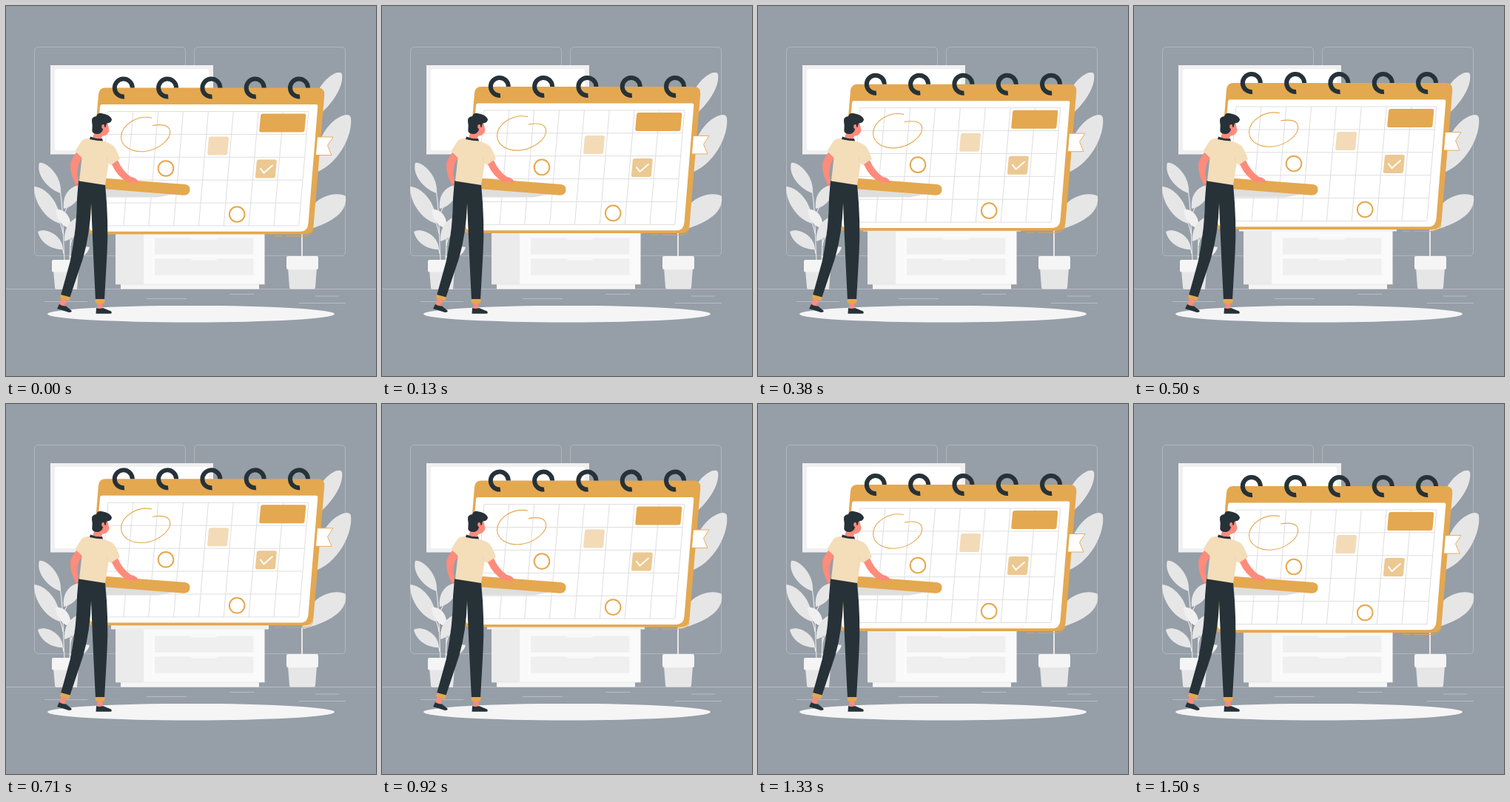
An HTML page with a canvas that plays this animation: 500 px wide and 500 px high, repeating every 1540 ms.

```html
<!DOCTYPE html>
<html lang="en">
<head>
<meta charset="utf-8">
<title>Calendar planning</title>
<style>
  html, body { margin: 0; width: 100%; height: 100%; overflow: hidden; background: #969ea7; }
  canvas { display: block; width: 500px; height: 500px; }
</style>
</head>
<body>
<canvas id="stage" width="500" height="500"></canvas>
<script>
const ctx = document.getElementById('stage').getContext('2d');

const LOOP = 1540, FPS = 24, LAST_STEP = 36;
const AMBER = '#e4a850', DARK = '#263238', SKIN = '#ff8b7b', SHIRT = '#f4ddb9';
const LINE = '#b7bdc4', PALE = '#f5f5f5', GREY = '#e6e6e6';

function fill(path, color) {
  ctx.fillStyle = color;
  ctx.fill(new Path2D(path));
}

function stroke(path, color, width = 1) {
  ctx.strokeStyle = color;
  ctx.lineWidth = width;
  ctx.stroke(new Path2D(path));
}

function box(x, y, w, h, color, r = 0) {
  ctx.fillStyle = color;
  ctx.beginPath();
  ctx.roundRect(x, y, w, h, r);
  ctx.fill();
}

function ellipse(x, y, rx, ry) {
  ctx.beginPath();
  ctx.ellipse(x, y, rx, ry, 0, 0, Math.PI * 2);
}

function drawRoom() {
  ctx.fillStyle = '#969ea7';
  ctx.fillRect(0, 0, 500, 500);

  ctx.strokeStyle = LINE;
  ctx.lineWidth = 0.8;
  for (const x of [38.5, 254.5]) {
    ctx.beginPath();
    ctx.roundRect(x, 55.5, 204, 282, 5);
    ctx.stroke();
  }
  stroke('M0 382.5H500 M52 399.5H110 M190 395.5H244 M302 389.5H336 M418 392H450 M396 401.5H459', LINE);

  box(60, 80, 220, 120.5, '#f0f0f0');
  box(66, 85, 208, 110, '#fff', 2);
}

function drawRightPlant() {
  fill('M454 92C450 84 426 98 418 124L414 154C438 138 457 110 454 92Z', GREY);
  fill('M466 151C464 140 438 152 427 176C420 192 415 210 413 227C449 217 469 174 466 151Z', GREY);
  fill('M459 257C450 251 424 254 412 273L402 304C427 297 463 284 459 257Z', GREY);
  stroke('M400 339V304Q402 298 412 291', '#f0f0f0', 1.8);
  fill('M381 354H420L418 380Q418 382.5 415 382.5H386Q383 382.5 383 380Z', GREY);
  box(379, 338, 43, 18, PALE, 2);
}

function drawLeftPlant() {
  stroke('M79 344C77 315 78 278 73 248 M77 308Q76 300 72 290 M78 335Q78 330 75 326 M77 290Q79 276 86 267', GREY, 1.2);
  stroke('M86 344Q88 318 86 297 M87 324Q88 313 95 307 M86 340Q92 332 104 330', '#f0f0f0', 1.2);
  fill('M45 212C52 209 76 227 74 253C59 249 40 229 45 212Z', GREY);
  fill('M38 244C51 244 74 263 73 294C54 289 37 265 38 244Z', GREY);
  fill('M43 305C53 299 76 309 77 329C62 329 47 321 43 305Z', GREY);
  fill('M104 241C84 243 76 257 78 274C92 271 103 258 104 241Z', GREY);
  fill('M67 275C77 273 89 283 87 300C76 299 68 288 67 275Z', '#f0f0f0');
  fill('M103 283C86 288 78 300 79 318C95 313 105 299 103 283Z', GREY);
  fill('M113 326C104 323 90 331 87 341C100 342 110 337 113 326Z', '#f0f0f0');
  fill('M64 357H98L96 383H69Q66 383 66 380Z', GREY);
  box(62, 343, 36, 16.5, PALE, 2);
}

function drawCabinet() {
  box(155, 375, 187, 7.5, PALE);
  box(148, 303, 38, 73, '#ebebeb');
  box(186, 303, 163.5, 73, '#fafafa');
  stroke('M148 376H349.5', '#e3e3e3', 0.7);
  box(142, 294, 213, 10.5, '#f0f0f0');
  for (const y of [313.5, 341.5]) {
    box(201, y, 133.5, 22, '#efefef');
    fill(`M248 ${y}H287L284 ${y + 2}H251Z`, '#fafafa');
  }
}

function drawGrid() {
  const top = 142.5, row = 30.9, column = 33.85, lean = 13;
  let lines = '';
  for (let i = 0; i <= 5; i++) {
    lines += `M${138 - lean * i / 5} ${top + row * i}h${column * 8}`;
  }
  for (let i = 0; i <= 8; i++) {
    lines += `M${138 + column * i} ${top}l${-lean} ${row * 5}`;
  }
  stroke(lines, '#dedede', 1);
}

// Slanted cell with softened corners
function cell(x, y, w, h, color) {
  ctx.save();
  ctx.transform(1, 0, -0.09, 1, x, y);
  box(0, 0, w, h, color, 2.5);
  ctx.restore();
}

function drawCalendar() {
  stroke('M363 311H373 M378 311H402Q413 311 415 302', AMBER, 0.9);
  fill('M134 110.5H421Q431 110.5 430.3 120L415.5 298Q414.5 308.5 404 308.5H118Q109 308.5 110 299L125 119Q126 110.5 134 110.5Z', AMBER);
  fill('M130 133H419Q421.5 133 421.3 135.5L408.5 294Q407.5 304.8 398 304.8H120Q112 304.8 113 296L127 136Q127 133 130 133Z', '#fff');
  drawGrid();

  cell(344.3, 145.5, 61.2, 25, AMBER);
  cell(274.2, 176.5, 27, 25, '#f3dbb8');
  cell(339, 207.5, 27, 25, '#ecc892');
  stroke('M343.5 219L348.5 225.5L360.5 215', '#fff', 2);

  stroke('M197 151.2C178 147 156 160 155.5 177C156 191 171 198 187 196.5C204 195 224 181 221.5 168C219.5 159 207 160 198 161.5', AMBER, 1.1);
  ctx.lineWidth = 2;
  for (const [x, y] of [[216, 219.5], [312.2, 281.5]]) {
    ellipse(x, y, 10.3, 10.3);
    ctx.stroke();
  }

  const flag = 'M420.5 177H442L434.5 188.5L440 201.5H418.5Z';
  fill(flag, '#fff');
  stroke(flag, AMBER, 0.9);

  ctx.strokeStyle = DARK;
  ctx.lineWidth = 6;
  for (let i = 0; i < 5; i++) {
    ctx.beginPath();
    ctx.arc(158.8 + 59.3 * i, 110.5, 12, Math.PI * 0.47, Math.PI * 2);
    ctx.stroke();
  }
}

function drawPen() {
  fill('M130 246L228 254L205 258.5H130Z', '#dedede');
  fill('M130 232.5L242 241Q249 242 248.5 249Q247.5 256 240 255.7L130 247Z', AMBER);
}

function drawMan() {
  // Feet and legs
  fill('M75 395L82 398L79 406L72 404Z M123 400H131L130 409H124Z', SKIN);
  fill('M72 403Q77 406 81 405.5L89 412Q88 414.5 85 414L69 409Z', DARK);
  fill('M122 408Q127 410 131 408L142 412.5Q144 415.5 141 415.8H121.5Z', DARK);
  fill('M98 236L134 241Q139 292 136.5 335L133 397H121Q118 340 115 266Q114 307 104 341L86 395L74 391L87 344Q96 298 96 260Z', DARK);
  fill('M74 390L87 393.5L85.5 398.5L73 395Z M120.5 396H134L133 401.5H121Z', AMBER);

  // Arm on the hip
  fill('M95 198Q86 209 87 217Q88 232 96 244L98 237Q95 224 98 214L104 203Z', SKIN);

  // Neck, shirt and collar
  fill('M120 168L132 172L127 182L117 179Z', SKIN);
  fill('M112 179Q104 179 101 184L93.5 196L102.5 205L99 236.5L134 242L139 211L142 215L154 207Q149 192 144 188Q136 183 128 182Z', SHIRT);
  fill('M135 203Q136 210 142 215L139 213Z', '#dfc79f');
  fill('M114 176.5Q122 180 130 179L131 182.5Q122 182 113 180Z', DARK);

  // Arm holding the pen
  fill('M143 214L151 208.5Q157 223 169 231Q176 232 178.5 237L177 239L164 238Q150 230 143 214Z', SKIN);

  // Head
  fill('M122 153L137 157L139.5 168Q138 174 132 175.5Q124 176 121 170Z', SKIN);
  fill('M116 156Q115 150 122 149Q124 144 129 145Q141 147 143 153Q143 158 136 158.5L134.5 164Q131 163 131 167Q129 173 123 173Q115 173 116.5 165Q117 161 116 156Z', DARK);
  ctx.fillStyle = SKIN;
  ellipse(131.2, 163, 2, 3);
  ctx.fill();
}

// Steady rise and fall: highest at 725 ms, lowest at 1495 ms
function floatOffset(time) {
  const step = Math.min(LAST_STEP, Math.floor((time + 4.9) * FPS / 1000));
  const ms = step * 1000 / FPS;
  const phase = ((ms - 725 + LOOP) % LOOP) / LOOP;
  return -9.4 + 10 * (1 - Math.abs(1 - 2 * phase));
}

function render(time) {
  drawRoom();
  drawRightPlant();
  drawLeftPlant();
  drawCabinet();
  ctx.fillStyle = PALE;
  ellipse(250, 416.2, 194, 11.3);
  ctx.fill();

  ctx.save();
  ctx.translate(0, floatOffset(time));
  drawCalendar();
  ctx.restore();

  drawPen();
  drawMan();
}

const start = performance.now();
function tick() {
  render((performance.now() - start) % LOOP);
  requestAnimationFrame(tick);
}
tick();
</script>
</body>
</html>
```
